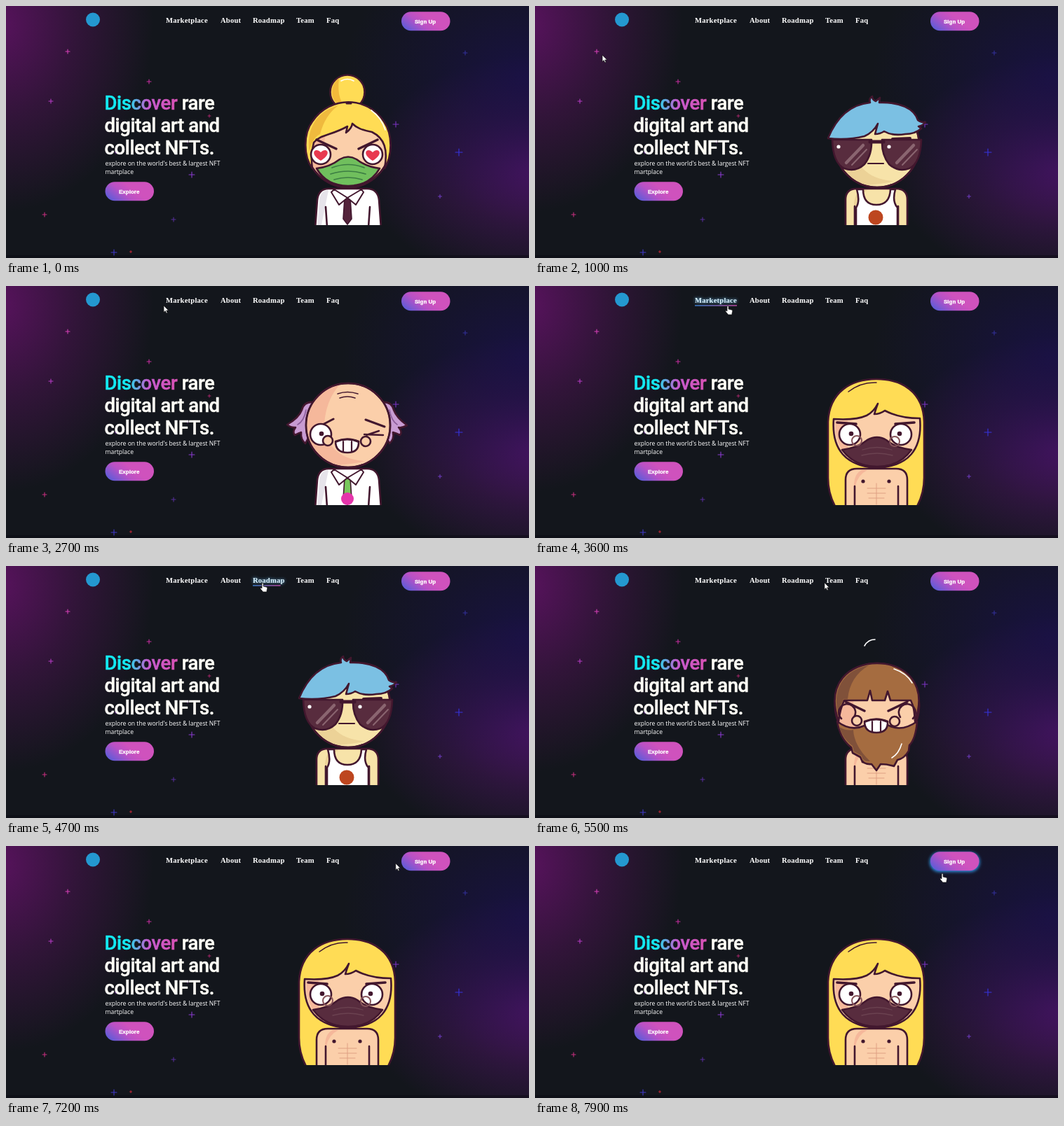
An HTML page for the animation above (8 s loop, 746 by 360 pixels).

```html
<!DOCTYPE html>
<html lang="en">
<head>
<meta charset="utf-8">
<title>NFT landing page</title>
<style>
html, body { margin: 0; width: 100%; height: 100%; overflow: hidden; background: #13161c; }
svg { display: block; width: 746px; height: 360px; }
.title { font: 500 27.4px Roboto, sans-serif; letter-spacing: -.35px; fill: #fffef6; stroke: #fffef6; stroke-width: .5; }
.sub { font: 8.6px "Open Sans", "Noto Sans", sans-serif; fill: #fff; }
.nav { font: bold 10.6px "Liberation Serif", serif; letter-spacing: .2px; fill: #fff; }
.btn { font: bold 8px "Liberation Sans", sans-serif; fill: #fff; stroke: #fff; stroke-width: .3; }
.ink { stroke: #42172e; stroke-width: 2.6; stroke-linejoin: round; stroke-linecap: round; }
</style>
</head>
<body>
<svg id="stage" viewBox="0 0 746 360"></svg>
<script>
const LOOP = 8000;
const INK = '#42172e', SKIN = '#fbcfaa', SHADE = '#f5b89b', YELLOW = '#ffdc55', PLUM = '#582c3e';
const stage = document.getElementById('stage');

const shape = (d, fill = 'none', more = '') => `<path class="ink" d="${d}" fill="${fill}" ${more}/>`;
const flat = (d, fill) => `<path d="${d}" fill="${fill}"/>`;
const ring = (x, y, r, fill) => `<circle class="ink" cx="${x}" cy="${y}" r="${r}" fill="${fill}"/>`;
const dot = (x, y, r, fill) => `<circle cx="${x}" cy="${y}" r="${r}" fill="${fill}"/>`;
const line = (d, color = INK, width = 2.6) =>
  `<path d="${d}" fill="none" stroke="${color}" stroke-width="${width}" stroke-linecap="round"/>`;

// Shared character parts
const head = (skin, shade) => ring(488, 199, 60, skin) +
  flat('M476 141A59 59 0 0 0 474 256Q500 254 512 250C470 248 450 220 455 188Q459 160 476 141Z', shade) +
  ring(488, 199, 60, 'none');

const torso = (skin, shade) =>
  shape('M443 318V277Q443 261 459 261H515Q531 261 531 277V318Z', skin) +
  flat('M457 313V286Q460 270 474 263H466Q455 268 455 286V313Z', shade) +
  line('M456 286V316M518 286V316');

const chest = () => torso(SKIN, SHADE) + dot(468, 279, 2.6, INK) + dot(505, 279, 2.6, INK) +
  line('M487 282V312M474 289H500M474 296H500M476 303H498', '#dfa083', 1);

const shirt = tie =>
  shape('M441 318L444 277Q446 261 460 261H515Q530 261 532 277L535 318Z', '#fff') +
  flat('M444 313L447 278Q448 264 460 263L450 313Z', '#e6e3ea') +
  line('M456 287L458 316M519 287L517 316') +
  shape('M483 274H491L493 304L487 312L481 304Z', tie, 'style="stroke-width:1.6"') +
  shape('M468 262L487 274L475 284L464 266ZM507 262L487 274L499 284L510 266Z', '#fff', 'style="stroke-width:2"');

const curls = () => ring(459, 221, 7, SKIN) + ring(513, 222, 7, SKIN);
const grin = () => curls() +
  shape('M470 222Q487 215 503 222Q504 238 487 238Q470 238 470 222Z', '#fff') +
  line('M481 222V237M493 222V237M470 223Q487 216 503 223', INK, 2.2);

const heartEye = x => ring(x, 212, 14, '#fff') +
  flat(`M${x} 221C${x - 18} 210 ${x - 7} 201 ${x} 209C${x + 7} 201 ${x + 18} 210 ${x} 221Z`, '#e8394f');
const stareEye = (x, pupil) => ring(x, 212, 15, '#fff') + dot(pupil, 211, 3.3, INK);

const bunGirl = () => shirt('#54233b') + ring(487, 123, 24.5, YELLOW) +
  flat('M465 121A22 22 0 0 0 489 145Q471 139 475 103Q466 110 465 121Z', '#f2b93b') +
  line('M478 107Q487 102 496 107', '#fff', 1.6) +
  head(SKIN, SHADE) +
  shape('M437 232C424 215 424 182 437 165C462 128 515 128 539 165C552 184 551 214 540 232C545 205 540 189 522 180' +
    'C507 177 500 174 494 168Q493 175 485 181L487 172C464 185 447 184 439 195Q434 213 437 232Z', YELLOW) +
  flat('M433 208C428 180 440 151 474 142Q455 156 448 183Q437 188 433 208Z', '#efba3e') +
  line('M521 149Q536 160 541 177', '#fff', 1.6) +
  line('M486 139H492', INK, 3) +
  line('M443 191L471 204M530 191L503 204', INK, 3.4) +
  heartEye(449) + heartEye(523) +
  shape('M443 232Q462 230 476 219Q488 212 500 219Q514 230 533 232Q519 257 488 257Q457 257 443 232Z', '#70bf5d') +
  line('M465 231Q488 222 511 231M463 240Q488 232 513 240M468 248Q488 242 508 248', '#3c7d43', 1.7);

const beardMan = () => chest() + head(SKIN, SHADE) +
  line('M470 114Q475 105 485 105', '#fff', 1.6) +
  shape('M433 222C414 167 449 139 488 139S561 167 542 222C541 207 540 200 536 192H507L503 179L499 192H481' +
    'L478 178L474 192H441Q435 205 433 222Z', '#a56c40') +
  flat('M432 208C423 170 447 147 476 142Q449 158 446 190H440Z', '#80513a') +
  line('M512 147Q530 153 538 167', '#fff', 1.6) +
  line('M443 194L470 207M531 194L504 207', INK, 3.4) +
  line('M437 218A12 12 0 1 1 455 216M539 218A12 12 0 1 0 521 216', INK, 2.6) +
  shape('M431 222C444 232 457 234 470 228Q488 218 505 228C517 234 531 232 545 222Q543 247 534 256L533 264' +
    'Q527 275 517 277L512 286Q502 283 493 283L487 292L480 283Q467 284 464 273L453 267L451 259Q435 247 431 222Z', '#a56c40') +
  flat('M434 230Q444 236 454 234Q455 257 478 279Q467 280 466 271L455 265L453 257Q439 247 434 230Z', '#80513a') +
  line('M523 254Q519 268 509 274', '#fff', 1.6) + grin();

const oldMan = () => shirt('#78c85c') + dot(487, 304, 9, '#e535ab') +
  shape('M438 166Q425 165 422 177Q418 188 401 198Q407 203 413 202Q408 209 412 213Q418 210 421 209Q420 219 427 225L438 204Z', '#c89bd2') +
  shape('M537 166Q550 165 553 177Q557 188 572 199Q565 203 560 202Q566 209 562 213Q556 210 552 209Q554 219 547 225L537 204Z', '#c89bd2') +
  line('M428 177Q425 193 416 198M547 177Q550 193 558 198', '#8b5c99', 1.6) +
  head(SKIN, SHADE) +
  line('M473 154Q487 149 502 154M476 160Q487 156 498 160', INK, 1.6) +
  line('M444 202L467 190M513 191L540 201', INK, 3) +
  stareEye(449, 450) + line('M511 212L538 213M514 213L532 207', INK, 2.4) + grin();

const longHair = () =>
  shape('M430 318Q418 298 418 274V194C420 151 451 133 487 133S554 151 555 194V274Q555 298 543 318Z', YELLOW) +
  line('M447 151Q465 137 487 138', INK, 1.5) +
  chest() +
  shape('M426 190Q458 192 473 185Q483 180 489 168Q486 176 484 183Q492 183 499 178Q520 189 549 189' +
    'Q555 256 488 260Q421 256 426 190Z', SKIN) +
  flat('M428 193Q438 193 446 192Q436 228 462 253Q428 241 428 193Z', SHADE) +
  line('M431 195L458 197M514 197L541 195', INK, 3.6) +
  stareEye(449, 451) + stareEye(522, 520) +
  shape('M438 234Q461 231 474 220Q488 212 501 220Q514 231 537 234Q520 258 488 258Q456 258 438 234Z', PLUM) +
  line('M467 234Q488 227 509 234M466 242Q488 236 510 242', '#6b4250', 1.3) +
  line('M466 221A7 7 0 1 1 459 214A7 7 0 0 1 466 221M520 222A7 7 0 1 1 513 215A7 7 0 0 1 520 222', '#86545a', 2);

const LENS = 'M424 191H480Q481 212 470 226Q457 238 441 232Q425 224 424 191Z';
const lens = x => `<g transform="translate(${x})">` + line('M444 224L468 199', '#8a6570', 4.5) +
  line('M452 227L473 205', '#8a6570', 2) + dot(433, 201, 2.6, '#fff') + '</g>';
const coolGuy = () => torso('#f7e3a9', '#ecd297') +
  shape('M459 262Q464 279 458 288V318H517V288Q509 279 514 262H507Q506 284 487 284T468 262Z', '#fff') +
  dot(486, 302, 10.5, '#bd461f') +
  head('#f7e3a9', '#ecd297') +
  shape('M418 189C429 162 447 141 478 138Q476 132 481 129Q481 134 486 136L492 131L491 138' +
    'C520 137 541 146 546 163Q551 167 557 166Q553 171 547 172L551 175Q542 183 528 183Q510 186 498 179' +
    'Q492 183 485 183L489 168Q483 180 470 186Q446 192 418 189Z', '#7bc0e3') +
  line('M440 192H464M510 190L535 189', INK, 4) +
  shape(LENS, PLUM) +
  `<g transform="matrix(-1 0 0 1 975 0)">${shape(LENS, PLUM)}</g>` +
  line('M478 194H497', INK, 5) + lens(0) + lens(72) +
  line('M475 225H497', INK, 2.2);

const AVATARS = [bunGirl, coolGuy, beardMan, oldMan, longHair];
const AVATAR_MS = 830, AVATAR_LEAD = 350;

// Page
const STARS = [[88, 65, 3, '#d840b8'], [64, 136, 3, '#b83cc8'], [204, 108, 3, '#c62fa0'], [290, 157, 2, '#a32668'],
  [265, 241, 4, '#8a3cd0'], [239, 305, 3, '#56309a'], [55, 298, 3, '#c83080'], [154, 352, 4, '#4038c8'],
  [178, 351, 1.5, '#b82535'], [556, 169, 4, '#7c34c4'], [646, 209, 5, '#3634e0'], [655, 67, 3, '#33309a'],
  [619, 272, 2.5, '#6f3cc0'], [157, 209, 2, '#713399'], [259, 194, 2, '#5c2970']];
const star = ([x, y, r, color]) => line(`M${x - r} ${y}H${x + r}M${x} ${y - r}V${y + r}`, color, 1.1);

// label, x, underline width, hover start, hover end
const LINKS = [['Marketplace', 228, 60, 2750, 3800], ['About', 306, 28, 3950, 4350], ['Roadmap', 352, 44, 4500, 5250],
  ['Team', 414, 25, 5550, 5950], ['Faq', 457, 17, 6200, 6620]];
const link = ([label, x]) =>
  `<text class="nav" x="${x}" y="24">${label}</text><rect class="bar" x="${x}" y="27.3" height="1.3" fill="url(#bar)"/>`;

const button = (x, y, label, tx) =>
  `<rect x="${x}" y="${y}" width="69.5" height="27" rx="13.5" fill="url(#btn)"/>` +
  `<text class="btn" x="${tx}" y="${y + 17}">${label}</text>`;

const glow = (id, x, y, rx, ry, color, alpha) =>
  `<radialGradient id="${id}" gradientUnits="userSpaceOnUse" cx="0" cy="0" r="1" ` +
  `gradientTransform="translate(${x} ${y}) scale(${rx} ${ry})"><stop stop-color="${color}" stop-opacity="${alpha}"/>` +
  `<stop offset=".5" stop-color="${color}" stop-opacity="${alpha * .45}"/>` +
  `<stop offset="1" stop-color="${color}" stop-opacity="0"/></radialGradient>`;
const GLOWS = [['g1', -10, 25, 220, 270, '#5f1264', .9], ['g2', 760, 235, 250, 165, '#561470', .85],
  ['g3', 740, 100, 260, 200, '#1a104e', .75]];

stage.innerHTML = `<defs>
  ${GLOWS.map(g => glow(...g)).join('')}
  <linearGradient id="btn" x1="0" y1=".75" x2=".6" y2=".45"><stop stop-color="#5f5cd8"/><stop offset=".6" stop-color="#b851c6"/><stop offset="1" stop-color="#cf52bd"/></linearGradient>
  <linearGradient id="word" gradientUnits="userSpaceOnUse" x1="142" y1="0" x2="245" y2="0"><stop offset=".3" stop-color="#12eaf2"/><stop offset=".58" stop-color="#c45cd0"/><stop offset="1" stop-color="#d951b4"/></linearGradient>
  <linearGradient id="bar"><stop stop-color="#3f8fe8"/><stop offset="1" stop-color="#d451b8"/></linearGradient>
  <filter id="blur" x="-30%" y="-60%" width="160%" height="220%"><feGaussianBlur stdDeviation="2.2"/></filter>
  <clipPath id="crop"><rect x="390" y="90" width="200" height="223"/></clipPath>
</defs>
<rect width="746" height="360" fill="#13161c"/>
${GLOWS.map(g => `<rect width="746" height="360" fill="url(#${g[0]})"/>`).join('')}
<rect y="356" width="746" height="4" fill="#080910" opacity=".4"/>
${STARS.map(star).join('')}
<circle id="logo" cx="124" cy="19.5" fill="#2498d0"/>
${LINKS.map(link).join('')}
<rect id="halo" x="563" y="9" width="71.5" height="28" rx="14" fill="#2f8fe0" filter="url(#blur)"/>
${button(564, 8.3, 'Sign Up', 583)}
<text class="title" x="140.5" y="148"><tspan fill="url(#word)" stroke="url(#word)">Discover</tspan> rare</text>
<text class="title" x="140.5" y="180">digital art and</text>
<text class="title" x="140.5" y="212">collect NFTs.</text>
<text class="sub" x="141.5" y="227.5">explore on the world's best &amp; largest NFT</text>
<text class="sub" x="141.5" y="240">martplace</text>
${button(141.5, 251.3, 'Explore', 161)}
<g clip-path="url(#crop)">${AVATARS.map(draw => `<g class="avatar">${draw()}</g>`).join('')}</g>
<g id="cursor" stroke="#111" stroke-width=".7" fill="#fff" stroke-linejoin="round">
  <path id="arrow" d="M0 0V9.6L2.2 7.6L3.8 11L5.3 10.3L3.8 7H6.8Z"/>
  <path id="hand" d="M-1 1Q0-.8 1.1 1V5L6 6.2Q7 6.6 6.8 8L6 11.2V13H.6L-3 8.6Q-3.6 6.8-2.2 7L-1 8Z"/>
</g>`;

const find = id => document.getElementById(id);
const [logo, halo, cursor, arrow, hand] = ['logo', 'halo', 'cursor', 'arrow', 'hand'].map(find);
const avatars = [...stage.querySelectorAll('.avatar')];
const labels = [...stage.querySelectorAll('.nav')];
const bars = [...stage.querySelectorAll('.bar')];
const show = (el, on) => { el.style.display = on ? '' : 'none'; };

// time, x, y of the cursor tip
const PATH = [[1000, 96, 70], [1400, 122, 20], [1700, 134, 24], [1900, 150, 31], [2700, 225, 28], [3000, 250, 24],
  [3600, 275, 28], [4000, 312, 24], [4300, 322, 23], [4700, 366, 24], [5200, 385, 23], [5600, 418, 24],
  [6400, 466, 24], [6900, 520, 30], [7400, 575, 22], [7900, 581, 39], [8000, 581, 39]];

const clamp = v => Math.max(0, Math.min(1, v));
const smooth = v => v * v * (3 - 2 * v);
const hover = (t, from, to, fade = 250) => smooth(clamp((t - from) / fade) * (1 - clamp((t - to) / fade)));

function cursorAt(t) {
  const i = Math.max(1, PATH.findIndex(p => p[0] >= t));
  const [t0, x0, y0] = PATH[i - 1], [t1, x1, y1] = PATH[i];
  const k = smooth(clamp((t - t0) / (t1 - t0)));
  return [x0 + (x1 - x0) * k, y0 + (y1 - y0) * k];
}

function render(t) {
  const current = Math.floor((t + AVATAR_LEAD) / AVATAR_MS) % AVATARS.length;
  avatars.forEach((el, i) => show(el, i === current));

  LINKS.forEach(([, , width, from, to], i) => {
    const k = hover(t, from, to);
    bars[i].setAttribute('width', width * k);
    labels[i].style.textShadow = k ? `0 0 4px rgba(120,200,255,${k})` : 'none';
    labels[i].style.fill = `rgb(${255 - 35 * k},${255 - 10 * k},255)`;
  });

  logo.setAttribute('r', 10 + hover(t, 1300, 1850));
  halo.setAttribute('opacity', hover(t, 7250, 8000));

  const [x, y] = cursorAt(t);
  const pointing = t > 7250 || LINKS.some(l => t >= l[3] && t < l[4]);
  show(cursor, t >= 1000);
  show(arrow, !pointing);
  show(hand, pointing);
  cursor.setAttribute('transform', `translate(${x} ${y})`);
}

const start = performance.now();
(function tick() {
  render((performance.now() - start) % LOOP);
  requestAnimationFrame(tick);
})();
</script>
</body>
</html>
```
